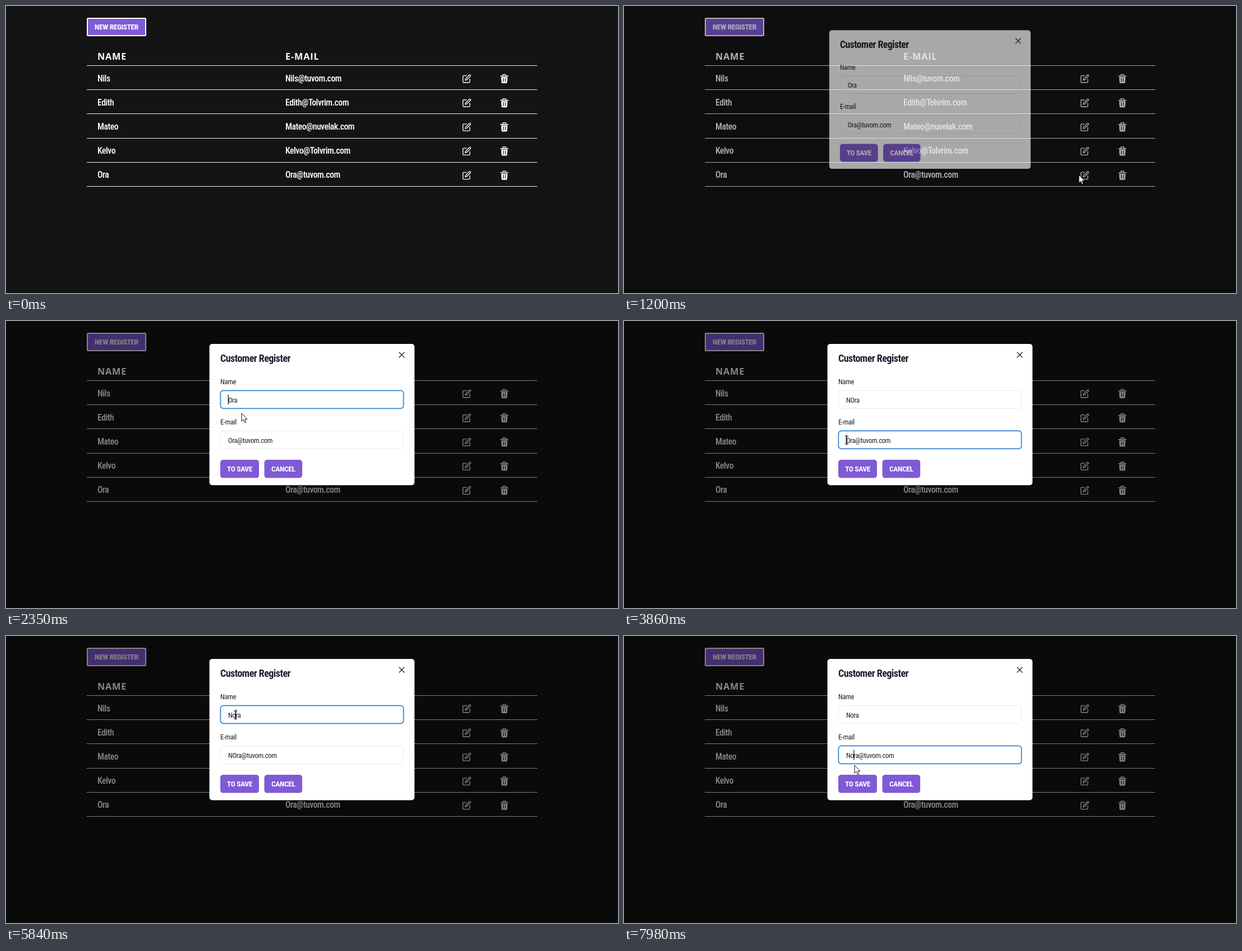
An HTML page that plays this animation: 1091x513 px, repeating every 8000 ms.

```html
<!DOCTYPE html>
<html lang="en">
<head>
<meta charset="utf-8">
<title>Customer table</title>
<style>
html, body { margin: 0; width: 100%; height: 100%; overflow: hidden; background: #141414; }
svg { display: block; width: 100%; height: 100%; }
text { white-space: pre; }
.slim { font-stretch: extra-condensed; letter-spacing: -0.03em; }
.head { font: 700 16.3px "Open Sans", "Noto Sans", sans-serif; letter-spacing: 0.05em; }
</style>
</head>
<body>
<svg id="stage" viewBox="0 0 1091 513" xmlns="http://www.w3.org/2000/svg"></svg>
<script>
const LOOP = 8000;
const PURPLE = '#805ad5', INK = '#1a202c', RULE = '#edf2f7';
const stage = document.getElementById('stage');

function add(parent, tag, attrs, content) {
  const el = document.createElementNS('http://www.w3.org/2000/svg', tag);
  set(el, attrs);
  if (content !== undefined) el.textContent = content;
  parent.appendChild(el);
  return el;
}
function set(el, attrs) {
  for (const k in attrs) el.setAttribute(k, attrs[k]);
}

// Narrowest installed family, then a size that suits the wanted text run.
function textWidth(family, weight, str) {
  const el = add(stage, 'text', {
    class: 'slim', 'font-family': family, 'font-weight': weight, 'font-size': 100
  }, str);
  const w = el.getComputedTextLength() / 100;
  el.remove();
  return w;
}
const families = ['Noto Sans', 'Open Sans', 'Roboto', 'Roboto Condensed', 'Liberation Sans Narrow']
  .map(name => `"${name}", sans-serif`);
const family = families
  .map(f => [textWidth(f, 400, 'NameE-mail'), f])
  .sort((a, b) => a[0] - b[0])[0][1];

function face(weight, size, sample, width) {
  const fit = width / textWidth(family, weight, sample);
  return { weight, size: Math.min(size * 1.14, fit) };
}
const bodyFace = face(400, 13.06, 'NameE-mail', 57);
const rowFace = face(500, 16.3, 'NameE-mail', 71.2);
const titleFace = face(600, 16.3, 'Customer Register', 125);
const buttonFace = face(800, 13.06, 'NEW REGISTER', 78);

// Text placed by the middle of its capitals.
function label(parent, str, x, cy, f, fill, anchor = 'start') {
  return add(parent, 'text', {
    class: 'slim', x, y: cy + f.size * 0.357, fill, 'text-anchor': anchor,
    'font-family': family, 'font-weight': f.weight, 'font-size': f.size
  }, str);
}
function box(parent, x, y, width, height, rx, attrs) {
  return add(parent, 'rect', { x, y, width, height, rx, ...attrs });
}

// Page
box(stage, 0, 0, 1091, 513, 0, { fill: '#141414' });
box(stage, 145, 22, 104, 31, 1.5, { fill: PURPLE, stroke: '#fff', 'stroke-width': 2 });
label(stage, 'NEW REGISTER', 197, 37.5, buttonFace, '#fff', 'middle');
add(stage, 'text', { class: 'head', x: 163, y: 96, fill: '#fff' }, 'NAME');
add(stage, 'text', { class: 'head', x: 498, y: 96, fill: '#fff' }, 'E-MAIL');

function editIcon(x, y) {
  const g = add(stage, 'g', {
    transform: `translate(${x} ${y}) scale(.68)`, fill: 'none', stroke: '#fff',
    'stroke-width': 2, 'stroke-linecap': 'round', 'stroke-linejoin': 'round'
  });
  add(g, 'path', { d: 'M11 4H4a2 2 0 0 0-2 2v14a2 2 0 0 0 2 2h14a2 2 0 0 0 2-2v-7' });
  add(g, 'path', { d: 'M18.5 2.5a2.1 2.1 0 0 1 3 3L12 15l-4 1 1-4z' });
}
function trashIcon(x, y) {
  const g = add(stage, 'g', { transform: `translate(${x} ${y})`, fill: '#fff' });
  add(g, 'path', { d: 'M4.6 3V1.6Q4.6 .6 5.6 .6H9.6Q10.6 .6 10.6 1.6V3', fill: 'none', stroke: '#fff', 'stroke-width': 1.4 });
  box(g, 0.2, 2.8, 14.8, 1.7, 0.8);
  add(g, 'path', {
    d: 'M2 5.3H13.2L12.6 14.6Q12.5 16.2 11 16.2H4.2Q2.7 16.2 2.6 14.6ZM5.2 7V14H6.4V7ZM8.8 7V14H10V7Z',
    'fill-rule': 'evenodd'
  });
}

box(stage, 144, 106, 803, 1, 0, { fill: RULE });
[['Nils', 'tuvom'], ['Edith', 'Tolvrim'], ['Mateo', 'nuvelak'], ['Kelvo', 'Tolvrim'], ['Ora', 'tuvom']]
  .forEach(([name, host], i) => {
    const y = 43.2 * i;
    label(stage, name, 163, 129 + y, rowFace, '#fff');
    label(stage, `${name}@${host}.com`, 498, 129 + y, rowFace, '#fff');
    editIcon(813.2, 121.8 + y);
    trashIcon(880.8, 121.8 + y);
    box(stage, 144, Math.round(149.2 + y), 803, 1, 0, { fill: RULE });
  });

// Dialog
const shade = box(stage, 0, 0, 1091, 513, 0, { fill: '#000' });
const dialog = add(stage, 'g', {});
box(dialog, 362.6, 41, 365.6, 252.4, 5, { fill: '#fff' });
label(dialog, 'Customer Register', 382, 67, titleFace, INK);
add(dialog, 'path', { d: 'M701 56l9 9m0-9l-9 9', stroke: INK, 'stroke-width': 1.3, 'stroke-linecap': 'round' });

function field(title, top) {
  label(dialog, title, 382, top - 16, bodyFace, INK);
  return {
    top,
    frame: box(dialog, 382.4, top + 0.4, 326.2, 32, 5, { fill: '#fff' }),
    text: label(dialog, '', 396, top + 17, bodyFace, INK)
  };
}
const fields = [field('Name', 124), field('E-mail', 196)];
const caret = box(dialog, 0, 0, 1.1, 18, 0, { fill: '#000' });

function button(str, x, w) {
  box(dialog, x, 248, w, 32.6, 5, { fill: PURPLE });
  label(dialog, str, x + w / 2, 264.3, buttonFace, '#fff', 'middle');
}
button('TO SAVE', 382, 69);
button('CANCEL', 460.5, 67.6);

// Pointer
const pointer = add(stage, 'g', {});
const spot = add(pointer, 'circle', { r: 10, fill: '#f5e600', opacity: 0.75 });
const arrow = add(pointer, 'path', {
  d: 'M0 0V14.4L3.3 11.4 5.5 16.6 7.8 15.6 5.6 10.5H10Z', fill: '#fff', stroke: '#000', 'stroke-width': 0.9
});
const beam = add(pointer, 'path', {
  d: 'M-3 -7H-1Q0 -7 0 -6Q0 -7 1 -7H3M0 -6V6M-3 7H-1Q0 7 0 6Q0 7 1 7H3',
  fill: 'none', stroke: '#111', 'stroke-width': 1.1
});

// Pointer path: time, x, y
const path = [
  [240, 1015, 510], [600, 925, 415], [980, 811, 302], [1200, 811, 302], [1450, 690, 262],
  [1600, 577, 217], [1700, 510, 187], [1770, 452, 168], [1840, 400, 146], [1970, 400, 146],
  [2040, 387, 141], [2190, 387, 141], [2340, 420, 165], [2800, 420, 165], [3060, 434, 180],
  [3280, 415, 202], [3450, 397, 213], [4160, 397, 213], [4400, 402, 186], [4650, 409, 141],
  [5840, 409, 141], [6080, 424, 160], [6350, 418, 188], [6560, 410, 204], [6670, 410, 204],
  [6720, 410, 207], [7820, 410, 207], [7980, 411, 231], [8000, 411, 231]
];
const clicks = [[980, 1130], [2040, 2170], [3610, 3750], [4720, 4900], [6700, 6880]];
// Focus changes: time, field
const focus = [[2060, 0], [3640, 1], [4750, 0], [6735, 1]];
// Typing: time, name, mail user, field with caret, caret index
const typing = [
  [0, 'Ora', 'Ora', -1, 0], [2060, 'Ora', 'Ora', 0, 0], [2750, 'NOra', 'Ora', 0, 1],
  [3640, 'NOra', 'Ora', 1, 0], [4080, 'NOra', 'NOra', 1, 1], [4740, 'NOra', 'NOra', 0, 2],
  [5320, 'Nra', 'NOra', 0, 1], [5470, 'Nora', 'NOra', 0, 2], [6760, 'Nora', 'NOra', 1, 2],
  [7340, 'Nora', 'Nra', 1, 1], [7470, 'Nora', 'Nora', 1, 2]
];

const clamp = v => Math.max(0, Math.min(1, v));
const mix = (a, b, p) => a + (b - a) * p;
const blend = (a, b, p) => `rgb(${a.map((v, i) => Math.round(mix(v, b[i], p)))})`;

// Cubic ease with control points (0, 0) and (.2, 1).
function easeOut(x) {
  let lo = 0, hi = 1;
  for (let i = 0; i < 20; i++) {
    const s = (lo + hi) / 2;
    if (0.6 * (1 - s) * s * s + s ** 3 < x) lo = s; else hi = s;
  }
  return lo * lo * (3 - 2 * lo);
}

// Smooth curve through the path that never overshoots a pause.
function along(t, axis) {
  if (t <= path[0][0]) return path[0][axis];
  const i = path.findIndex(k => k[0] > t) - 1;
  const slope = j => (path[j + 1][axis] - path[j][axis]) / (path[j + 1][0] - path[j][0]);
  const tangent = j => {
    if (j < 1 || j > path.length - 2) return 0;
    const a = slope(j - 1), b = slope(j);
    return a * b <= 0 ? 0 : 2 * a * b / (a + b);
  };
  const span = path[i + 1][0] - path[i][0], s = (t - path[i][0]) / span, r = 1 - s;
  return path[i][axis] * (1 + 2 * s) * r * r + path[i + 1][axis] * s * s * (3 - 2 * s)
    + span * (tangent(i) * s * r * r - tangent(i + 1) * s * s * r);
}

function focusLevel(t, index) {
  let level = 0;
  for (const [start, who] of focus) {
    if (t >= start) level = mix(level, who === index ? 1 : 0, easeOut(clamp((t - start) / 220)));
  }
  return level;
}

function draw(t) {
  const open = easeOut(clamp((t - 1142) / 200));
  const scale = mix(0.95, 1, open);
  shade.setAttribute('opacity', 0.48 * open);
  set(dialog, {
    opacity: open,
    transform: `translate(545.4 167.2) scale(${scale}) translate(-545.4 -167.2)`
  });

  const x = along(t, 1), y = along(t, 2);
  const [, name, user, active, index] = typing.filter(k => k[0] <= t).pop();
  const values = [name, `${user}@tuvom.com`];
  let inField = false;
  fields.forEach((f, i) => {
    const over = open > 0.9 && x > 382 && x < 709 && y > f.top && y < f.top + 32.5;
    const level = focusLevel(t, i);
    inField = inField || over;
    if (f.text.textContent !== values[i]) f.text.textContent = values[i];
    set(f.frame, {
      stroke: blend(over ? [203, 213, 224] : [226, 232, 240], [49, 130, 206], level),
      'stroke-width': mix(0.9, 1.7, level)
    });
  });

  caret.setAttribute('visibility', active < 0 ? 'hidden' : 'inherit');
  if (active >= 0) {
    const f = fields[active];
    const before = index ? f.text.getSubStringLength(0, index) : 0;
    set(caret, { x: 395.7 + before, y: f.top + 7.5 });
  }

  set(pointer, {
    transform: `translate(${x} ${y})`,
    visibility: t < 240 ? 'hidden' : 'visible'
  });
  spot.setAttribute('cx', inField ? -2.5 : 0);
  spot.setAttribute('display', clicks.some(([a, b]) => t >= a && t < b) ? 'inline' : 'none');
  arrow.setAttribute('display', inField ? 'none' : 'inline');
  beam.setAttribute('display', inField ? 'inline' : 'none');
}

const begin = performance.now();
function tick() {
  draw((performance.now() - begin) % LOOP);
  requestAnimationFrame(tick);
}
tick();
</script>
</body>
</html>
```
